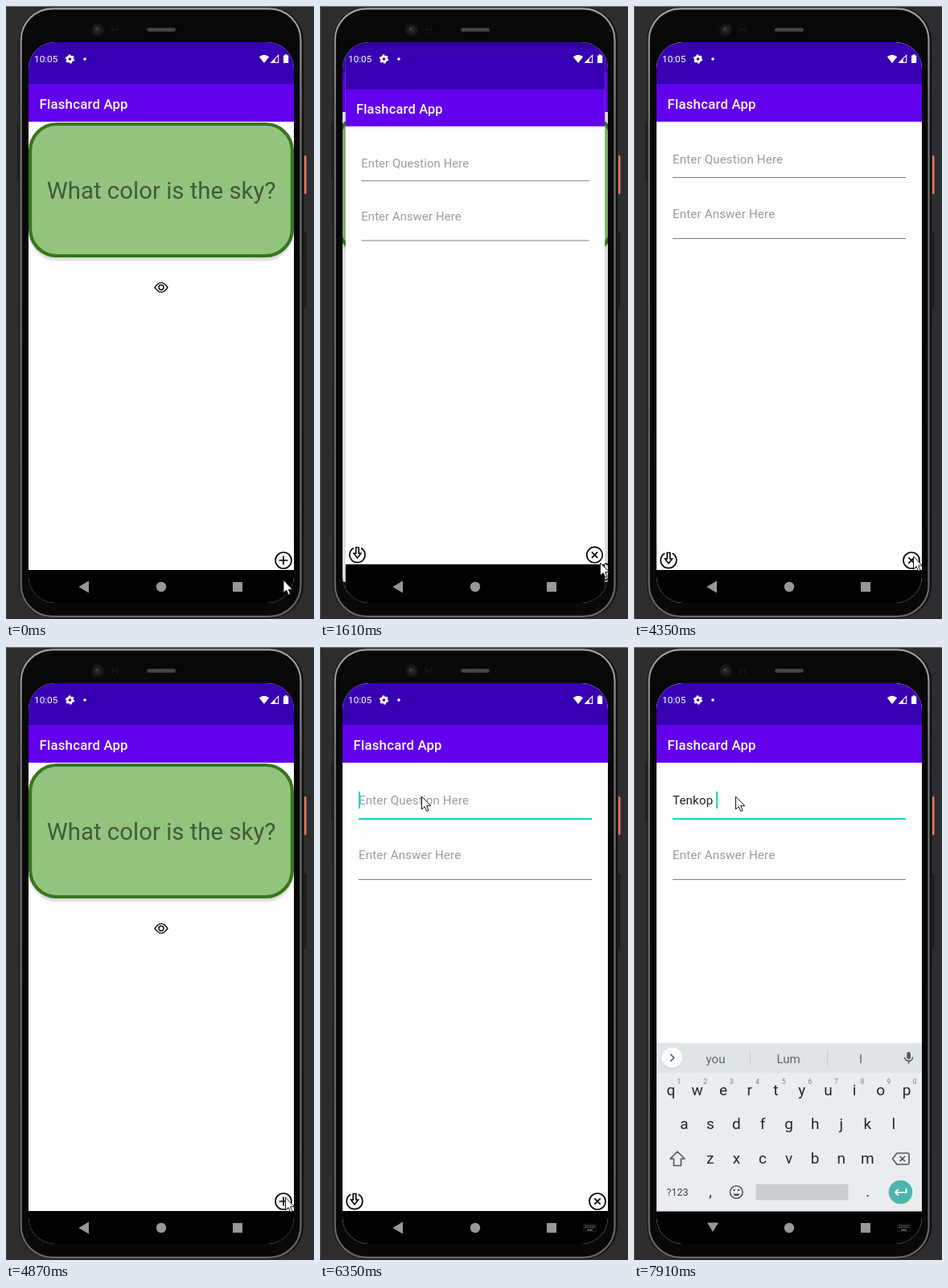
These frames come from a looping animation (383x763 px, 8000 ms). An HTML page:

```html
<!DOCTYPE html>
<html lang="en">
<head>
<meta charset="utf-8">
<title>Flashcard app</title>
<style>
html, body { margin: 0; width: 100%; height: 100%; overflow: hidden; background: #2c2d2f; }
svg { display: block; width: 383px; height: 763px; }
text { font-family: Roboto, "Open Sans", sans-serif; white-space: pre; }
.mid { text-anchor: middle; }
.field { font-size: 15.13px; letter-spacing: .0094em; }
.caps .key { text-transform: uppercase; }
.line { fill: none; stroke: #000; stroke-width: 1.7; }
.tool { fill: none; stroke: #4c585e; stroke-width: 1.6; stroke-linejoin: round; }
</style>
</head>
<body>
<svg id="stage" viewBox="0 0 383 763"></svg>
<script>
const LOOP = 8000;
const CX = 193, CY = 395;

// time, x, y of the pointer tip (no x: hidden)
const POINTER = [
  [0, 345, 714.5], [120, 348, 734], [400, 348, 722], [520, 348, 710], [640, 348, 698], [790, 348.5, 693],
  [3010, 248.5, 543], [3130, 163.5, 430], [3380, 223, 681], [3500],
  [3750, 336.5, 651], [3870, 346, 664], [3990, 354, 676], [4110, 354, 683], [4230, 350, 685], [4350, 347.5, 685],
  [5990, 262, 470], [6110, 160, 240], [6230, 130, 174], [6350, 126.5, 186]
];

// time, card window scale, form window scale, form opacity
const WINDOWS = [
  [0, 1, 1, 0],
  [1610, 1.048, .977, 1], [1760, 1.048, .995, 1], [1880, 1, 1, 1],
  [4630, 1.03, .95, .6], [4750, 1.005, .92, .1], [4870, 1, 1, 0],
  [5500, 1.048, .977, 1], [5620, 1.048, .995, 1], [5740, 1, 1, 1]
];

// time, typed text, three suggestions
const TYPING = [
  [0, "", "I", "the", "you"],
  [6870, "T", "The", "T", "This"],
  [7130, "Te", "Tell", "Te", "Team"],
  [7250, "Ten", "Tend", "Ten", "Tent"],
  [7390, "Tenk", "Tend", "Ten", "Tent"],
  [7510, "Tenk", "“Tenk”", "Ten", "Tent"],
  [7630, "Tenko", "“Tenko”", "Ten", "Tenor"],
  [7770, "Tenkop", "“Tenkop”", "Tenor", "Tenors"],
  [7910, "Tenkop ", "you", "Lum", "I"]
];

const FOCUS = 6350, KEYS_IN = 6470, KEYS_UP = 6610, CAPS_ON = 6750, CAPS_OFF = 6870;

const rect = (x, y, w, h, fill, more = "") => `<rect x="${x}" y="${y}" width="${w}" height="${h}" fill="${fill}" ${more}/>`;
const disc = (x, y, r, fill, more = "") => `<circle cx="${x}" cy="${y}" r="${r}" fill="${fill}" ${more}/>`;
const path = (d, more = "") => `<path d="${d}" ${more}/>`;
const text = (x, y, size, fill, str, more = "") => `<text x="${x}" y="${y}" font-size="${size}" fill="${fill}" ${more}>${str}</text>`;
const field = (y, fill, str, more = "") => `<text x="48" y="${y}" fill="${fill}" class="field" ${more}>${str}</text>`;

function phone() {
  return rect(0, 0, 383, 763, "#2c2d2f") + rect(0, 0, 383, 1, "#77787a") + rect(0, 0, 1, 763, "#48494b") +
    rect(14, 145, 3, 71, "#1b1c1e", 'rx="1"') +
    rect(370, 186, 3.5, 48, "#e9795d", 'rx="1.5"') +
    rect(370.5, 282, 3, 94, "#191a1c", 'rx="1.5"') +
    rect(16, 1.5, 354.5, 760.5, "#101011", 'rx="42" stroke="#29292a"') +
    rect(18.7, 3.3, 347.8, 756.5, "#080808", 'rx="39" stroke="url(#metal)" stroke-width="2.2"') +
    disc(114, 29.5, 8, "#161617") + disc(114, 29.5, 4.5, "#232427") + disc(113, 28.5, 1.5, "#45484e") +
    path("M132 25v9M138 25v9M132 29.5h6", 'stroke="#1d1d1e" fill="none"') +
    rect(175, 27, 36, 5, "#3b3b3c", 'rx="2.5"') +
    path("M178 29.5h31", 'stroke="#5a5a5b" stroke-width="2" stroke-dasharray="1.5 1.5"');
}

function appWindow(body) {
  return rect(28, 45, 330, 698, "#fefefe") + body +
    rect(28, 45, 330, 52.5, "#3700b3") + rect(28, 97, 330, 47, "#6200ee") +
    text(41.5, 127.5, 16.8, "#fff", "Flashcard App", 'font-weight="500" letter-spacing=".0125em"') +
    rect(28, 702, 330, 41, "#000");
}

function cardBody() {
  return rect(29, 149, 328, 168, "#000", 'rx="34" opacity=".13" filter="url(#soft)"') +
    rect(30.1, 147, 325.8, 164, "#92c47d", 'rx="33" stroke="#37761d" stroke-width="4.2"') +
    text(193, 240, 29.4, "#000", "What color is the sky?", 'class="mid" fill-opacity=".54"') +
    path("M185 350.3Q193 338.5 201 350.3Q193 362 185 350.3Z", 'class="line" style="stroke-width:1.4"') +
    disc(193, 350.3, 3, "none", 'class="line" style="stroke-width:1.4"') +
    disc(345, 690, 10, "none", 'class="line"') + path("M339.5 690h11M345 684.5v11", 'class="line"');
}

function formBody() {
  const hint = "#9b9b9b";
  return field(196.2, hint, "Enter Question Here", 'id="hint"') +
    field(196.2, "#202020", "", 'id="typed"') +
    rect(48, 198.5, 0, 1, "#444", 'id="compose"') +
    rect(48, 180, 2, 21, "#03dac5", 'id="caret"') +
    rect(48, 213, 290, 1, "#7d7d7d", 'id="rule"') +
    field(263.8, hint, "Enter Answer Here") +
    rect(48, 289, 290, 1, "#7d7d7d") +
    path("M38.2 681.3A9.8 9.8 0 1 0 47.8 681.3", 'class="line"') +
    path("M41.2 680.5h3.6v7.5h2.7l-4.5 6-4.5-6h2.7z", 'class="line" style="stroke-width:1.6"') +
    disc(345, 690, 10, "none", 'class="line"') + path("M341.3 686.3l7.4 7.4M348.7 686.3l-7.4 7.4", 'class="line"');
}

function keyboard() {
  const step = 32.57, ink = "#20292d";
  const row = (letters, x, y) => [...letters].map((c, i) => text(x + i * step, y, 19, ink, c, 'class="mid key"')).join("");
  const digits = [..."1234567890"].map((c, i) => text(56 + i * step, 544, 8.5, "#778287", c, 'class="mid"')).join("");
  const words = [101.5, 192, 282].map((x, i) => text(x, 517.5, 15, "#5c686e", "", `class="mid" id="word${i}"`)).join("");
  return rect(28, 493, 330, 210, "#e9edf0") + rect(28, 493, 330, 37, "#dfe4e7") +
    disc(47.5, 512, 13, "#000", 'opacity=".13"') + disc(47.5, 511.3, 12.8, "#fff") +
    path("M45.3 506.8l4.5 4.5-4.5 4.5", 'class="tool"') + words +
    rect(144, 502, 1, 19, "#c3c9cc") + rect(240, 502, 1, 19, "#c3c9cc") +
    rect(339.3, 504, 4.6, 9, "#4c585e", 'rx="2.3"') + path("M336.7 510.5a4.9 4.9 0 0 0 9.8 0M341.6 515.4v3.2", 'class="tool"') +
    row("qwertyuiop", 46, 558) + digits + row("asdfghjkl", 62.3, 600) + row("zxcvbnm", 94.8, 642.5) +
    path("M54 628l9 9h-4.5v8.5h-9V637H45z", 'class="tool" id="shift"') +
    path("M327 630h13.5q1.5 0 1.5 1.5v11q0 1.5-1.5 1.5H327l-5.5-7zM330.5 633.7l6.6 6.6M337.1 633.7l-6.6 6.6", 'class="tool"') +
    text(54, 682.7, 12.5, "#37444a", "?123", 'class="mid"') +
    text(95, 683.5, 18, ink, ",", 'class="mid"') + text(290.5, 683.5, 18, ink, ".", 'class="mid"') +
    disc(127.3, 678.5, 7.8, "none", 'class="tool"') + disc(124.5, 676, 1.3, "#4c585e") + disc(130.1, 676, 1.3, "#4c585e") +
    path("M123 680.5a4.7 4.7 0 0 0 8.6 0z", 'fill="#4c585e"') +
    rect(151.5, 668.5, 115, 20, "#c9cdd0", 'rx="1.5"') +
    disc(331.5, 678.5, 14.8, "#4db6ac") +
    path("M338.5 674v4.8h-13.5M328.8 674.8l-4 4 4 4", 'fill="none" stroke="#fff" stroke-width="1.8"');
}

function statusBar() {
  const white = 'fill="#fff"';
  return text(35, 70, 11.8, "#fff", "10:05") +
    disc(79.5, 66, 3.2, "none", 'stroke="#fff" stroke-width="2.8"') +
    disc(79.5, 66, 4.9, "none", 'stroke="#fff" stroke-width="1.6" stroke-dasharray="2.57 2.56"') +
    disc(98, 66, 1.8, "#fff") +
    path("M314.8 63.3Q321 58 327.2 63.3L321 71z", white) +
    path("M329.7 70.4h9v-9z", 'fill="none" stroke="#fff" stroke-width="1.1"') + path("M329.7 70.4h5v-5z", white) +
    path("M345 61.5h1.8v-1.3h2.6v1.3h1.8v9.6H345z", white);
}

function navBar() {
  const gray = "#989898";
  let dots = "";
  for (let i = 0; i < 12; i++) dots += rect(329.5 + i % 6 * 2.2, 719.8 + (i / 6 | 0) * 2.3, 1.3, 1.3, "#858585");
  return path("M90.3 723l12.7-7.4v14.8z", `fill="${gray}" id="back"`) +
    path("M91 716.5h14l-7 11.5z", `fill="${gray}" id="down"`) +
    disc(193, 723, 6.2, gray) + rect(282, 717, 12, 12, gray) +
    `<g id="keysIcon">${rect(328, 718.5, 15.2, 9, "none", 'stroke="#333" stroke-width=".6"')}${dots}${rect(332, 725, 7, 1.3, "#858585")}</g>`;
}

document.getElementById("stage").innerHTML = `
<defs>
  <linearGradient id="metal" x2="0" y2="1">
    <stop offset="0" stop-color="#a2a2a2"/><stop offset=".2" stop-color="#747474"/><stop offset="1" stop-color="#666"/>
  </linearGradient>
  <filter id="soft"><feGaussianBlur stdDeviation="1.3"/></filter>
  <clipPath id="screen"><rect x="28" y="45" width="330" height="698" rx="33"/></clipPath>
  <clipPath id="keysArea"><rect x="28" y="45" width="330" height="657.5"/></clipPath>
</defs>
${phone()}
<g clip-path="url(#screen)">
  <g id="card">${appWindow(cardBody())}</g>
  ${rect(28, 45, 330, 698, "#000", 'id="dim" opacity=".13"')}
  <g id="form">${appWindow(formBody())}</g>
  <g clip-path="url(#keysArea)"><g id="keys">${keyboard()}</g></g>
  ${statusBar()}${navBar()}
</g>
${path("M0 0V16L3.7 12.6 6.2 18.4 8.6 17.4 6.2 11.7H11.3Z", 'id="pointer" fill="#fff" stroke="#14141c" stroke-width="1"')}`;

const el = {};
document.querySelectorAll("[id]").forEach(node => el[node.id] = node);

const at = (table, t) => table.findLast(step => step[0] <= t);
const show = (node, on) => node.setAttribute("visibility", on ? "visible" : "hidden");
const zoom = (node, s) => node.setAttribute("transform", `translate(${CX} ${CY}) scale(${s}) translate(${-CX} ${-CY})`);
const put = (node, str) => { if (node.textContent !== str) node.textContent = str; };

function render(t) {
  const [, cardScale, formScale, alpha] = at(WINDOWS, t);
  zoom(el.card, cardScale);
  zoom(el.form, formScale);
  show(el.form, alpha > 0);
  el.form.setAttribute("opacity", alpha);
  show(el.dim, alpha > 0 && cardScale > 1.01);

  const [, typed, ...words] = at(TYPING, t);
  put(el.typed, typed);
  words.forEach((word, i) => put(el["word" + i], word));
  const width = typed ? el.typed.getComputedTextLength() : 0;
  const focused = t >= FOCUS;
  show(el.hint, !typed && alpha > 0);
  show(el.caret, focused);
  el.caret.setAttribute("x", 48 + width);
  el.compose.setAttribute("width", typed.endsWith(" ") ? 0 : width);
  el.rule.setAttribute("fill", focused ? "#03dac5" : "#7d7d7d");
  el.rule.setAttribute("height", focused ? 2 : 1);

  const up = t >= KEYS_UP;
  const caps = t >= CAPS_ON && t < CAPS_OFF;
  show(el.keys, t >= KEYS_IN);
  el.keys.setAttribute("transform", `translate(0 ${up ? 0 : 90})`);
  el.keys.setAttribute("class", caps ? "caps" : "");
  el.shift.style.fill = caps ? "#4c585e" : "none";
  show(el.keysIcon, focused);
  show(el.back, !up);
  show(el.down, up);

  const [, x, y] = at(POINTER, t);
  show(el.pointer, x !== undefined);
  if (x !== undefined) el.pointer.setAttribute("transform", `translate(${x} ${y})`);
}

function tick() {
  render(performance.now() % LOOP);
  requestAnimationFrame(tick);
}
tick();
</script>
</body>
</html>
```
